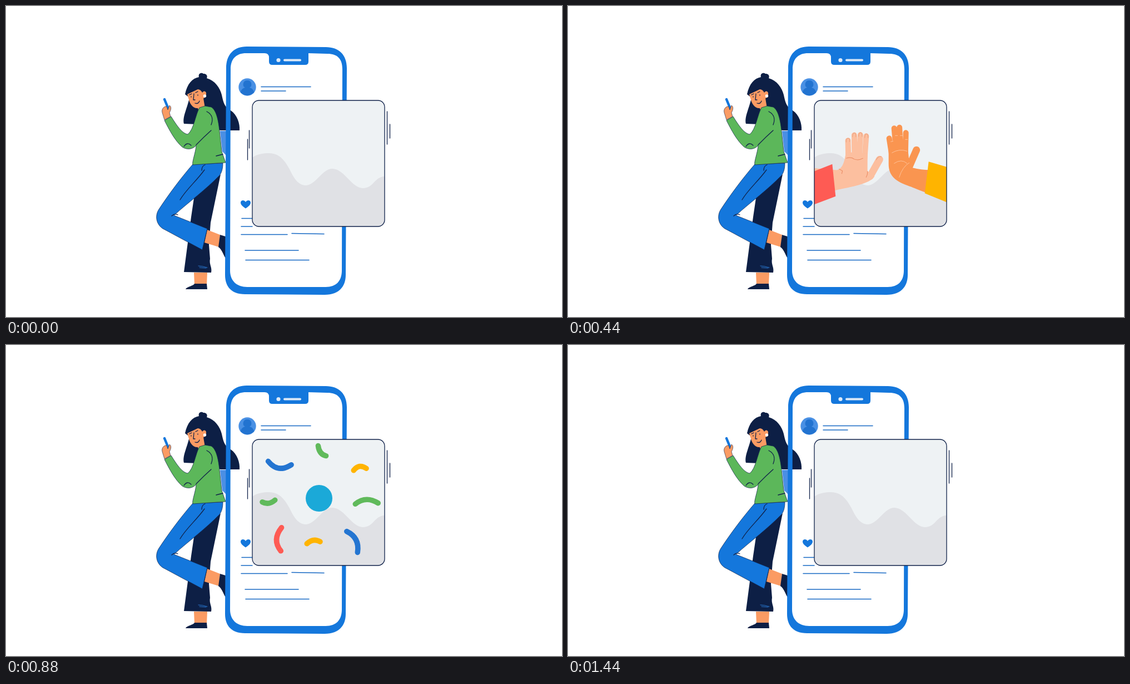
An HTML page for the animation above (1680 ms loop, 1000 px wide and 560 px high).

```html
<!DOCTYPE html>
<html lang="en">
<head>
<meta charset="utf-8">
<title>High five post</title>
<style>
  html, body { margin: 0; width: 100%; height: 100%; overflow: hidden; background: #fff; }
  svg { display: block; width: 100%; height: 100%; }
  .line { fill: none; stroke-linecap: round; stroke-linejoin: round; }
  .ink { stroke: #10224a; stroke-width: 1.3; }
  .skin { fill: #fb9b63; }
  .navy { fill: #0d1f45; }
  .blue { fill: #1477dc; }
  .finger { stroke-width: 10; }
  .thumb { stroke-width: 13; }
  #confetti path { fill: none; stroke-width: 9.5; stroke-linecap: round; transform-box: fill-box; transform-origin: center; }
</style>
</head>
<body>
<svg viewBox="0 0 1000 560">
  <defs><clipPath id="card"><rect x="443" y="170" width="238" height="227" rx="12"/></clipPath></defs>

  <g id="woman">
    <path class="navy" d="M322 159C326 140 335 130 347 128C345 121 352 119 355 122C361 121 363 127 361 130C376 134 385 148 388 160C391 174 393 182 404 188C416 196 421 212 420 224H386L345 213L320 212C317 200 326 184 330 165Z"/>
    <path class="skin" d="M326 159L345 150Q350 150 353 156C356 151 361 154 360 159C360 164 357 166 355 166L358 184L346 187L345 184C337 185 331 177 329 169Z"/>
    <circle cx="357.500" cy="162" r="2.700" fill="#fff"/>
    <path class="line ink" d="M330 160l4-2M341 156l4-2M338 158l-1 11 3 0M340 175Q346 177 348 171M333 163v1M345 160v1"/>
    <path fill="#4b8fe4" d="M385 225H397V270L389 262Z"/>
    <path class="navy" d="M386 303L338 346L333 380L320 479L369 480C371 470 365 466 367 455L365 430L368 390Z"/>
    <path class="line" stroke="#2876ce" d="M346 468l8 1 8 2M348 471l12 1"/>
    <path class="skin" d="M338 480H362L361 502H339ZM362 403L385 412L383 434L357 426Z"/>
    <path class="navy" d="M323 510C325 505 338 504 339 500L361 500L362 510ZM385 412L395 415V454C391 449 389 439 382 434Z"/>
    <path class="blue" stroke="#10224a" stroke-width=".7" d="M336 285L390 283C390 295 387 302 383 306C360 330 330 352 302 377L362 401L353 439L286 403C270 396 267 378 275 366C292 340 315 309 336 285Z"/>
    <path class="line ink" d="M357 295C341 317 325 329 313 349M298 378Q303 373 309 376M352 296Q352 288 358 286"/>
    <path fill="#5cb75a" stroke="#10224a" stroke-width=".7" d="M348 183L358 180L369 182C378 187 382 205 384 225L388 262L395 282L336 286C334 281 341 265 342 251C335 259 325 259 317 254C304 243 293 222 285 206L297 199C307 215 317 230 327 231C338 222 341 195 348 183Z"/>
    <path class="line ink" d="M342 250L356 236L369 224M361 190C371 195 373 204 369 214M320 253Q326 244 333 251M378 270L390 267"/>
    <path class="line" stroke="#1477dc" stroke-width="4.500" d="M285 168L292 185"/>
    <path class="skin" stroke="#10224a" stroke-width=".6" d="M285 205L281 192C279 185 285 180 289 181L291 187L294 179C298 181 297 187 294 192L296 199Z"/>
  </g>

  <g id="phone">
    <path class="blue" fill-rule="evenodd" d="M396 112C396 87 410 73 433 73L575 74C599 74 613 88 613 112L611 484C611 507 597 520 573 520L430 519C407 519 394 507 394 484Z
      M404 114L403 476C403 495 415 506 434 506H575C594 506 604 495 604 476L605 114C605 95 596 86 578 86L544 85V100Q544 106 538 106H479Q473 106 473 100V93Q473 85 465 85H432C414 85 404 95 404 114Z"/>
    <circle cx="490" cy="97.500" r="3.600" fill="#dce9f8"/>
    <path class="line" stroke="#dce9f8" stroke-width="4" d="M501 97.500H529"/>
    <circle cx="434" cy="146" r="15.700" fill="#4990e4"/>
    <path fill="#2273d0" d="M434 134a7 7 0 0 1 4 13C443 148 446 152 446 156Q434 166 422 156C422 152 425 148 430 147A7 7 0 0 1 434 134Z"/>
    <path class="line" stroke="#1769c4" stroke-width="1.500" d="M459 145.500H548M459 153H503M424 382.500H443M423 397H443M423 411.500H506M514 409.500L572 410.500M430 440H526M431 457.500H545"/>
    <path class="blue" d="M431 364.500C426 361 422 358 422 354C422 349 429 349 431 353C433 349 440 349 440 354C440 358 436 361 431 364.500Z"/>
  </g>

  <path class="line ink" d="M437.500 224V256M434.500 240V277M685.500 190V249M690.500 213V238"/>

  <g clip-path="url(#card)">
    <rect x="443" y="170" width="238" height="227" fill="#eef2f4"/>
    <path fill="#e0e1e5" d="M443 273C452 266 464 265 473 265C494 265 504 282 512 298C520 314 527 322 538 323C558 323 568 293 587 293C608 293 622 328 642 328C662 328 662 307 682 307V398H443Z"/>
    <circle id="badge" r="24" fill="#1ba9d8"/>
    <g id="confetti"></g>

    <g id="rightHand" fill="#fa9550" stroke="#fa9550">
      <path class="line finger" d="M574 237L580 275M583 219L587 265M592.500 217.500L595 265M604 227L603 270"/>
      <path class="line thumb" d="M623 258L610 288"/>
      <path stroke="none" d="M573 257L608 260L610 279L616 290C640 296 665 296 700 285V350C650 342 627 329 607 322C582 313 573 302 573 283Z"/>
      <path class="line" stroke="#ffc197" d="M579 263Q592 255 606 260M583 282Q596 273 606 282M610 281Q598 288 592 307M577 243l4-1M585 232l4 0M594 232l4 0M603 239l4 0"/>
    </g>
    <path id="rightSleeve" fill="#ffb400" d="M636 279L740 309V381L629 336Z"/>

    <g id="leftHand" fill="#fcbf9f" stroke="#fcbf9f">
      <path class="line finger" d="M506 241L508 275M517 231L519 272M528 230L527 270M538.500 232L537 272"/>
      <path class="line thumb" d="M564 273L548 304"/>
      <path stroke="none" d="M503 262L542 263L543 295L556 304C548 317 520 323 484 332L430 345V292L488 295C497 292 501 283 503 262Z"/>
      <path class="line" stroke="#e9885f" d="M504 273Q513 270 518 274Q526 277 534 272M492 293l6 3-1 5M541 306Q544 300 543 295"/>
      <path class="line" fill="#fbd3bf" stroke="#e9a17f" d="M503 244q-1-7 3-7t3 6M514 234q0-7 3-7t3 7M525 233q0-7 3-7t3 7M536 235q0-7 3-7t3 7M558 274q3-7 9-6"/>
    </g>
    <path id="leftSleeve" fill="#fe5b54" d="M488 283L384 324V383L494 341Z"/>
  </g>
  <rect class="line ink" x="443" y="170" width="238" height="227" rx="12"/>
</svg>

<script>
const LOOP = 1680, STEP = 40;
const el = id => document.getElementById(id);

// Piecewise linear value at time t from [time, value] pairs.
function at(t, keys) {
  if (t <= keys[0][0]) return keys[0][1];
  for (let i = 1; i < keys.length; i++) {
    const [t0, a] = keys[i - 1], [t1, b] = keys[i];
    if (t <= t1) return a + (b - a) * (t - t0) / (t1 - t0);
  }
  return keys[keys.length - 1][1];
}

const BLUE = '#2475d1', GREEN = '#60ba5b', YELLOW = '#ffb400', RED = '#fe5b54';
const ribbons = [
  [BLUE, 'M472 208Q488 231 513 217', 640],
  [GREEN, 'M562 181Q563 197 575 200', 640],
  [YELLOW, 'M625 225Q636 213 648 223', 640],
  [GREEN, 'M461 282Q472 289 484 280', 720],
  [GREEN, 'M628 285Q648 271 669 286', 720],
  [RED, 'M497 329Q478 350 493 371', 720],
  [YELLOW, 'M541 357Q553 347 565 355', 720],
  [BLUE, 'M614 335Q637 348 631 374', 720]
].map(([color, d, start]) => {
  const path = document.createElementNS('http://www.w3.org/2000/svg', 'path');
  path.setAttribute('d', d);
  path.setAttribute('stroke', color);
  el('confetti').append(path);
  return { path, start };
});

// The sleeve trails the hand by `pull` while the arm reaches in.
function moveArm(side, dx, dy, pull, tilt) {
  el(side + 'Hand').setAttribute('transform', `translate(${dx} ${dy}) rotate(${tilt} 520 275)`);
  el(side + 'Sleeve').setAttribute('transform', `translate(${dx + pull} ${dy})`);
}

function draw(t) {
  const pull = at(t, [[200, 30], [360, 15], [560, 0]]);
  moveArm('left',
    at(t, [[200, -140], [280, -62], [360, -17], [480, 3], [560, 0], [720, -62], [800, -135]]),
    at(t, [[200, 30], [360, 5], [480, 0], [560, 0], [720, 14], [800, 25]]),
    -pull, at(t, [[200, 12], [360, 6], [480, 0], [560, 0], [720, 3]]));
  moveArm('right',
    at(t, [[200, 140], [280, 60], [360, 17], [480, -3], [560, 0], [720, 58], [800, 130]]),
    at(t, [[200, 20], [360, 4], [480, 0], [560, 0], [720, 7], [800, 15]]),
    pull, 0);

  const pop = at(t, [[520, 0], [560, .35], [680, 1.08], [720, 1], [1280, 1], [1440, 0]]);
  el('badge').setAttribute('transform', `translate(563 276) scale(${pop})`);

  const turn = 7.5 * (Math.cos((t - 1280) / 480 * 2 * Math.PI) - 1);
  for (const { path, start } of ribbons) {
    const size = at(t, [[start, 0], [start + 160, 1], [1280, 1], [1440, 0]]);
    path.style.transform = `rotate(${turn}deg) scale(${size})`;
    path.style.display = size ? '' : 'none';
  }
}

const begin = performance.now();
function tick() {
  const t = (performance.now() - begin) % LOOP;
  draw(Math.floor(t / STEP) * STEP);
  requestAnimationFrame(tick);
}
tick();
</script>
</body>
</html>
```
